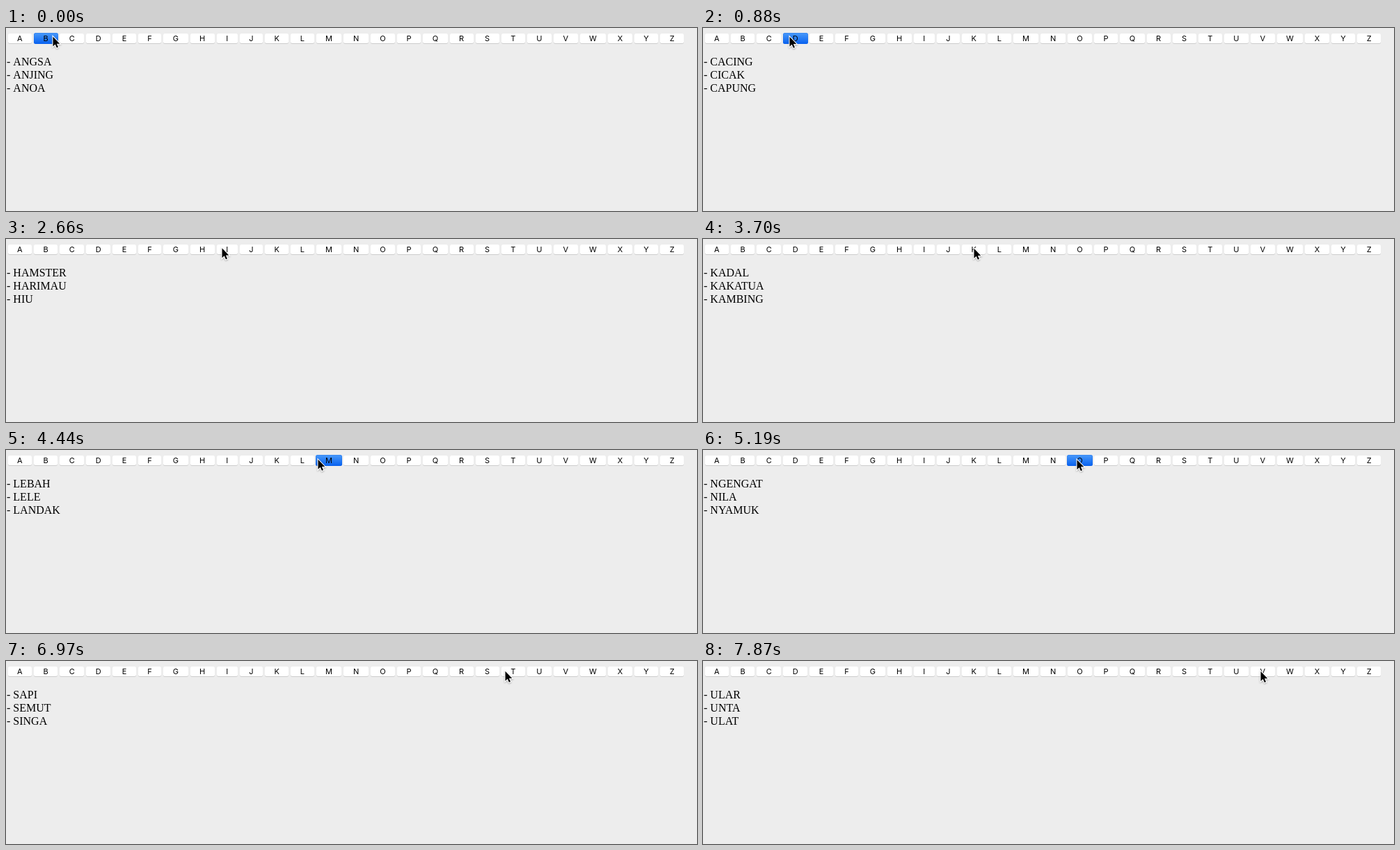
Write an HTML page that moves like this. It is 993 by 264 pixels and loops after 8 s.

```html
<!DOCTYPE html>
<html lang="id">
<head>
<meta charset="utf-8">
<title>Animal alphabet</title>
<style>
  html, body { margin: 0; width: 100%; height: 100%; overflow: hidden; background: #ededed; }
  nav, ul, svg { position: absolute; margin: 0; padding: 0; }
  nav { left: 2.5px; top: 8px; width: 971.5px; height: 14px; display: flex; gap: 3px; }
  nav span {
    flex: 1 1 auto; position: relative; border-radius: 2.5px; background: #fff;
    box-shadow: 0 1px 0 #cdcdcd; font: 11px/14px Inter, sans-serif; text-align: center;
  }
  nav .pressed { background: none; box-shadow: none; }
  nav .pressed::before {
    content: ""; position: absolute; inset: -1px -0.5px; z-index: -1; border-radius: 2.5px;
    background: linear-gradient(#4a9afa, #0761f0); box-shadow: inset 0 0 0 1px #0050d833;
  }
  nav span { z-index: 0; }
  ul { left: 1px; top: 39px; list-style: none; font: 16px/19px "Liberation Serif", serif; }
  li::before { content: "-"; display: inline-block; width: 9.33px; }
  svg { left: 0; top: 0; overflow: visible; }
</style>
</head>
<body>
<nav id="buttons"></nav>
<ul id="words"><li></li><li></li><li></li></ul>
<svg width="993" height="264">
  <filter id="soft" x="-50%" y="-50%" width="200%" height="200%">
    <feDropShadow dx="0" dy="1" stdDeviation="0.8" flood-opacity="0.35"/>
  </filter>
  <path id="cursor" d="M0 0V14L3.2 11L5.4 16L7.5 15.1L5.4 10.2H9.8Z"
        stroke="#fff" stroke-width="2" paint-order="stroke" filter="url(#soft)"/>
</svg>
<script>
const LOOP = 8000, STEP = 148.75, LEAD = 21, LAST = 53;

// Pointer tip on its way along the row: step and x.
const path = [[0, 68], [6, 125], [18, 311], [25, 390], [35, 538], [42, 648], [LAST, 802]];

const animals = `ANGSA,ANJING,ANOA
BADAK,BEBEK,BERUANG
CACING,CICAK,CAPUNG
DOMBA,DUGONG,DINGO
ELANG,EMU,ENTOK
FLAMINGO,FALKON,FOSSA
GAJAH,GAGAK,GURITA
HAMSTER,HARIMAU,HIU
IKAN,IGUANA,ITIK
JERAPAH,JANGKRIK,JALAK
KADAL,KAKATUA,KAMBING
LEBAH,LELE,LANDAK
MACAN,MONYET,MUSANG
NGENGAT,NILA,NYAMUK
ORANGUTAN,ORCA,ONTA
PANDA,PAUS,PENYU
Q,Q,Q
RUSA,RUBAH,RAYAP
SAPI,SEMUT,SINGA
TIKUS,TUPAI,TAPIR
ULAR,UNTA,ULAT`.split("\n").map(row => row.split(","));

const buttons = [..."ABCDEFGHIJKLMNOPQRSTUVWXYZ"].map(letter => {
  const button = document.createElement("span");
  button.textContent = letter;
  return document.getElementById("buttons").appendChild(button);
});
const words = document.querySelectorAll("#words li");
const cursor = document.getElementById("cursor");

// Clicks follow at an even pace, beginning with B.
const pressStep = click => Math.floor(2.63 * click + 0.85);

function pointerX(step) {
  const i = Math.max(1, path.findIndex(([s]) => s >= step));
  const [s0, x0] = path[i - 1], [s1, x1] = path[i];
  return Math.round(x0 + (x1 - x0) * (step - s0) / (s1 - s0));
}

function draw(time) {
  const step = Math.min(LAST, Math.floor((time % LOOP + LEAD) / STEP));
  let chosen = 0;
  while (chosen < animals.length - 1 && pressStep(chosen) < step) chosen++;
  const next = chosen + 1;
  const isDown = next < animals.length && pressStep(chosen) === step;

  buttons.forEach((button, i) => button.classList.toggle("pressed", isDown && i === next));
  words.forEach((word, i) => word.textContent = animals[chosen][i]);
  const y = 12.5 + 2.5 * step / LAST;
  cursor.setAttribute("transform", `translate(${pointerX(step) - 0.5} ${y})`);
}

const start = performance.now();
function tick() {
  draw(performance.now() - start);
  requestAnimationFrame(tick);
}
tick();
</script>
</body>
</html>
```
